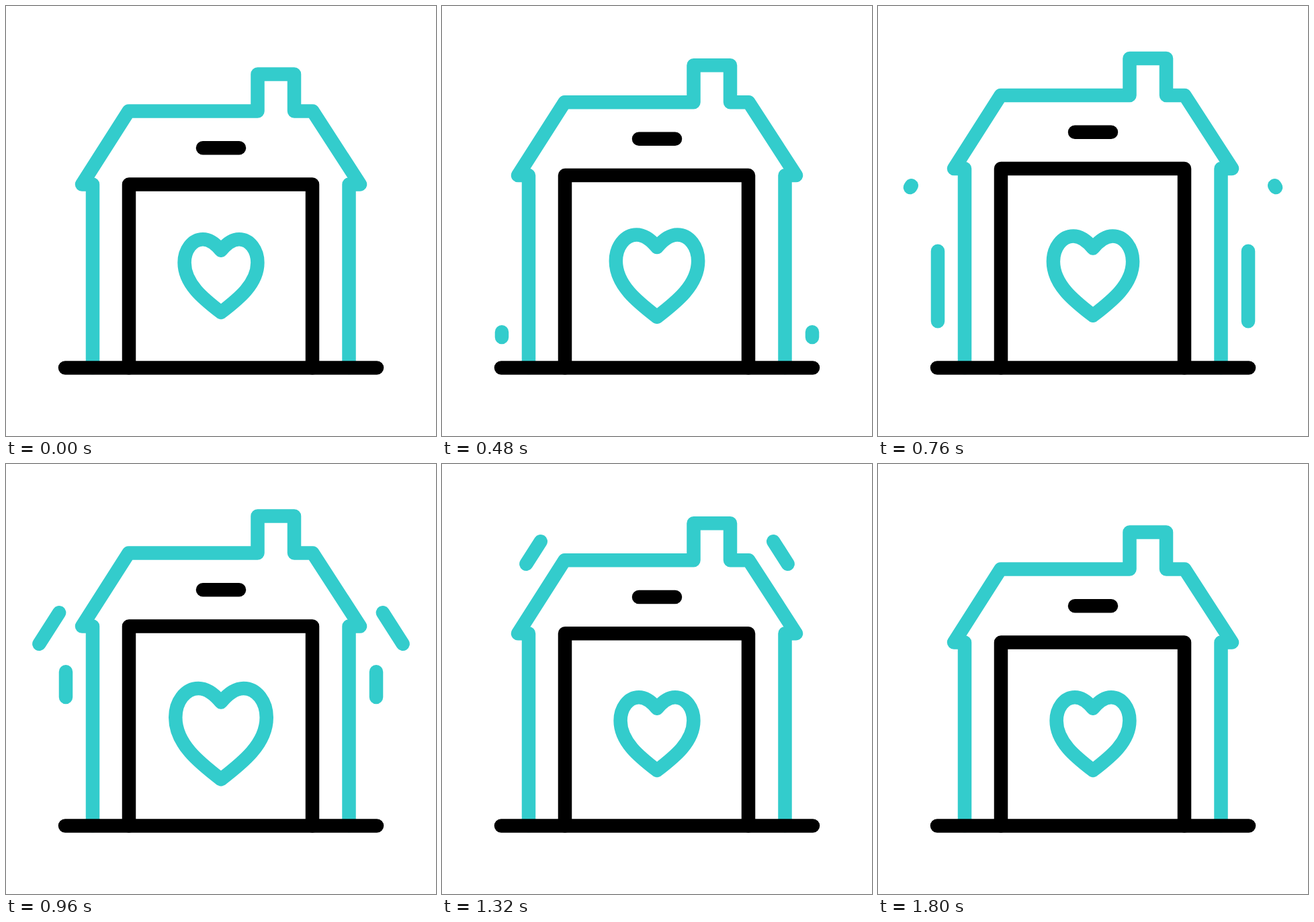
These frames come from a looping animation (640 px wide and 640 px high, 1.96 s). An HTML page:

```html
<!DOCTYPE html>
<html lang="en">
<head>
<meta charset="utf-8">
<title>House with heart</title>
<style>
  html, body { margin: 0; width: 100%; height: 100%; overflow: hidden; background: #fff; }
  svg { display: block; width: 100%; height: 100%; }
  path { fill: none; stroke: #000; stroke-width: 20.5; stroke-linecap: round; stroke-linejoin: round; }
  .teal { stroke: #33cccc; }
</style>
</head>
<body>
<svg viewBox="0 0 640 640">
  <path id="house" class="teal"/>
  <path id="door"/>
  <path id="sign"/>
  <path id="heart" class="teal"/>
  <path id="sides" class="teal"/>
  <path id="slants" class="teal"/>
  <path d="M88 538.4H552"/>
</svg>
<script>
const LOOP = 1960, STEP = 40;
const LIFT = 24.2, SWELL = 0.25;
const HEART_X = 320, HEART_Y = 401.5;

const $ = id => document.getElementById(id);
const draw = (id, d) => $(id).setAttribute('d', d);
const mix = (a, b, k) => a + (b - a) * k;

// Symmetric cubic-bezier(.55, 0, .45, 1), solved by bisection.
function ease(x) {
  if (x <= 0) return 0;
  if (x >= 1) return 1;
  let lo = 0, hi = 1, s;
  for (let i = 0; i < 30; i++) {
    s = (lo + hi) / 2;
    const v = 1.65 * s * (1 - s) ** 2 + 1.35 * s * s * (1 - s) + s ** 3;
    if (v < x) lo = s; else hi = s;
  }
  return s * s * (3 - 2 * s);
}

const ramp = (t, from, to) => ease((t - from) / (to - from));
const pulse = (t, from, peak, to) => ramp(t, from, peak) - ramp(t, peak, to);

// Heart outline keeps its stroke width while its points scale about the centre.
function heartPath(scale) {
  const point = (x, y) => `${HEART_X + x * scale} ${HEART_Y + y * scale} `;
  const half = side => 'M' + point(0, -37.8) +
    'C' + point(-8 * side, -47.5) + point(-17 * side, -54.3) + point(-27 * side, -54.3) +
    'C' + point(-43 * side, -54.3) + point(-54.4 * side, -38) + point(-54.4 * side, -19.5) +
    'C' + point(-54.4 * side, 12) + point(-26 * side, 34.5) + point(0, 54.5);
  return half(1) + half(-1);
}

// A trimmed line and its mirror image.
function mirrored(x1, y1, x2, y2, start, end) {
  if (end - start < 1e-4) return '';
  const xa = mix(x1, x2, start), ya = mix(y1, y2, start);
  const xb = mix(x1, x2, end), yb = mix(y1, y2, end);
  return `M${xa} ${ya}L${xb} ${yb}M${640 - xa} ${ya}L${640 - xb} ${yb}`;
}

function render(t) {
  const lift = LIFT * pulse(t, 40, 880, 1800);
  const eave = 265.5 - lift, roof = 156.6 - lift, top = 101.6 - lift;
  draw('house', `M129 538V${eave}H113L182.5 ${roof}H374.5V${top}H429V${roof}` +
    `H456.5L527 ${eave}H510.5V538`);
  draw('door', `M183 538.4V${eave}H456V538.4`);
  draw('sign', `M293 ${211.2 - lift}H347`);

  const beat = pulse(t, 40, 320, 640) + pulse(t, 640, 920, 1240);
  draw('heart', heartPath(1 + SWELL * beat));

  draw('sides', mirrored(89, 493, 89, 306, ramp(t, 600, 1160), ramp(t, 360, 1040)));
  draw('slants', mirrored(48, 270, 147.2, 114.6, ramp(t, 888, 1560), ramp(t, 680, 1360)));
}

const begin = performance.now();
function tick() {
  const t = (performance.now() - begin) % LOOP;
  render(Math.floor(t / STEP) * STEP);
  requestAnimationFrame(tick);
}
tick();
</script>
</body>
</html>
```
